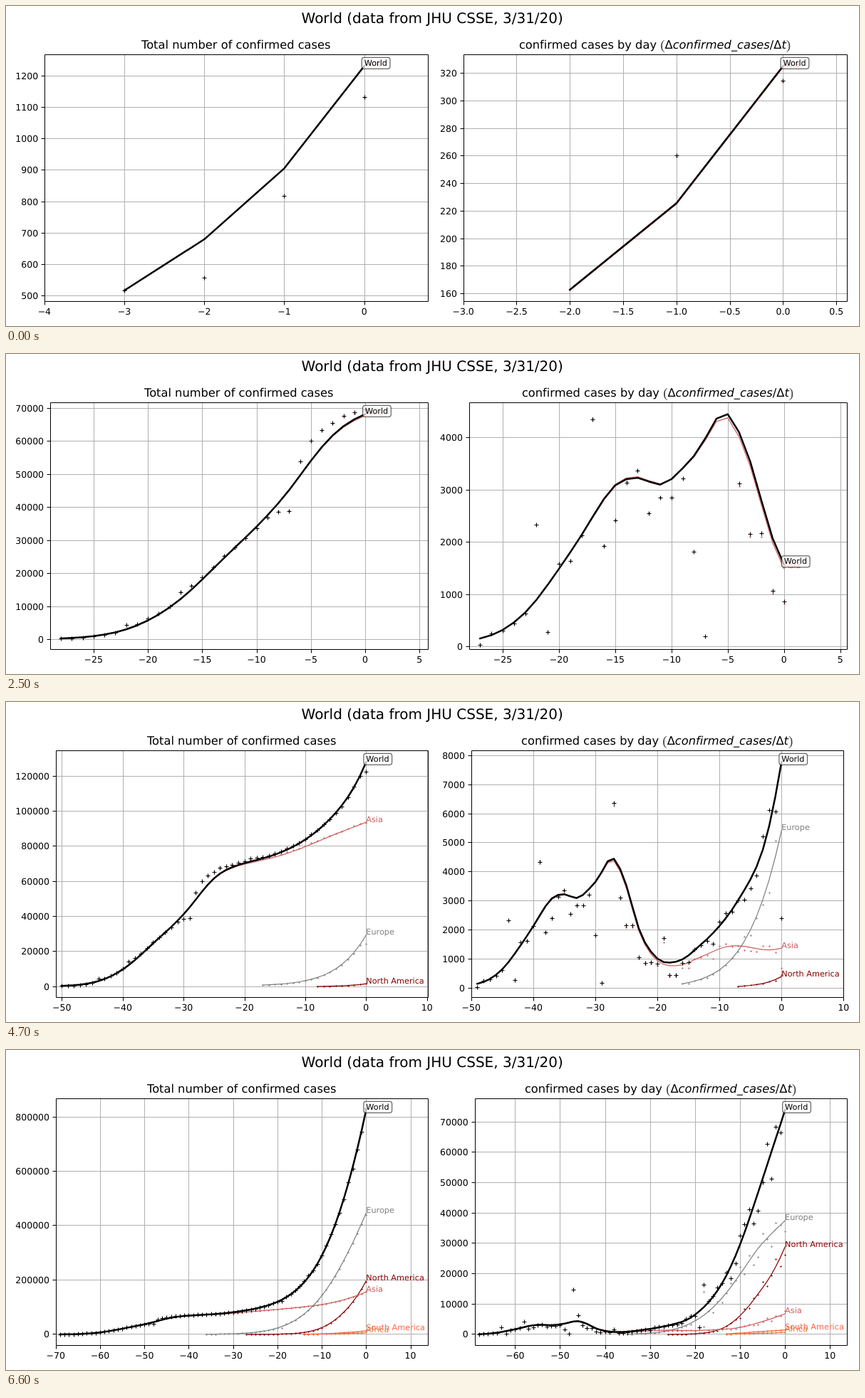
An HTML page for the animation above (9600 ms loop, 1197 by 450 pixels).

```html
<!DOCTYPE html>
<html lang="en">
<head>
<meta charset="utf-8">
<title>Confirmed cases</title>
<style>
  html, body { margin: 0; width: 100%; height: 100%; overflow: hidden; background: #fff; }
  svg { display: block; width: 1197px; height: 450px; }
  text { font-family: "DejaVu Sans", sans-serif; font-variant-ligatures: none; text-rendering: geometricPrecision; white-space: pre; }
  .tick { font-size: 12.5px; }
  .title { font-size: 16.25px; text-anchor: middle; }
  .name { font-size: 11.25px; }
  .paren { font: 19px "Liberation Serif", serif; fill: #444; }
  .var { font-style: italic; }
</style>
</head>
<body>
<svg id="stage" viewBox="0 0 1197 450"></svg>
<script>
const STEP_MS = 100, LAST_STEP = 66, LOOP_MS = 9600, LAST_DAY = 69;
const TOP = 68.8, BOTTOM = 415.8;
const PAD = 13.5, TICK = 4.375, DIGIT = 7.95, OVERHANG = 3.1, SHIFT = -.18;

// Smooth growth curve: cubic Hermite through [day, value] keys on a log scale, one value per day.
function growth(keys) {
  const points = keys.map(([day, value]) => [day, Math.log(value)]);
  const slope = i => (points[i + 1][1] - points[i][1]) / (points[i + 1][0] - points[i][0]);
  const end = points.length - 1;
  const tangents = points.map(([day], i) => {
    if (i === 0) return slope(0);
    if (i === end) return slope(end - 1);
    const before = day - points[i - 1][0], after = points[i + 1][0] - day;
    return (slope(i - 1) * after + slope(i) * before) / (before + after);
  });
  const values = [];
  for (let day = points[0][0]; day <= LAST_DAY; day++) {
    const i = Math.min(end - 1, points.findLastIndex(p => p[0] <= day));
    const [x, a] = points[i], b = points[i + 1][1], h = points[i + 1][0] - x, t = (day - x) / h;
    const ease = t * t * (3 - 2 * t);
    values.push(Math.exp(a + (b - a) * ease
      + h * t * (1 - t) * ((1 - t) * tangents[i] - t * tangents[i + 1])));
  }
  return values;
}

// Noisy daily reports that drift back to the trend's total; "jumps" are days reported far off trend.
function reports(start, trend, noise, jumps = {}) {
  let seed = 11 + start, gap = 0;
  const random = () => (seed = seed * 16807 % 2147483647) / 2147483647;
  for (let i = 0; i < 5; i++) random();
  return trend.map((v, i) => {
    const wobble = 1 + noise * (2 * random() - 1);
    const value = v * (jumps[start + i] ?? wobble) + (start + i in jumps ? 0 : .25 * gap);
    gap += v - value;
    return value;
  });
}
const cumulate = (base, daily) => daily.reduce((sums, v) => [...sums, sums.at(-1) + v], [base]);

const worldTrend = growth([[1, 163], [2, 226], [4, 470], [7, 1190], [10, 2140], [13, 3095], [15, 3240],
  [17, 3110], [20, 3660], [23, 4460], [25, 3550], [28, 1580], [31, 910], [33, 920], [37, 1510], [43, 3030],
  [47, 4780], [50, 7785], [55, 16900], [58, 26000], [62, 42300], [66, 60400], [69, 74050]]);
const worldReports = reports(1, worldTrend, .14,
  { 1: .25, 6: 2.6, 7: .24, 11: 1.75, 20: .5, 21: .05, 22: 3.42, 23: 1.43, 31: 1.9, 50: .31, 51: 1.81 });
const asiaShare = growth([[1, .997], [20, .995], [28, .95], [31, .912], [34, .815], [37, .72], [41, .595],
  [45, .376], [50, .178], [55, .106], [58, .083], [63, .0835], [69, .093]]);
const europeTrend = growth([[34, 160], [40, 640], [45, 2020], [50, 5430], [55, 12100], [59, 19900],
  [63, 28400], [66, 33300], [69, 37600]]);
const northTrend = growth([[43, 70], [46, 135], [50, 410], [54, 1480], [58, 4900], [62, 11400],
  [66, 19900], [69, 28900]]);
const southTrend = growth([[56, 300], [62, 850], [69, 1550]]);
const africaTrend = growth([[56, 140], [62, 390], [69, 800]]);

// "start" is the day of the first total; daily values begin one day later.
const region = (name, color, start, base, trend, daily) => ({
  name, color,
  total: { start, line: cumulate(base, trend), dots: cumulate(base, daily) },
  daily: { start: start + 1, line: trend, dots: daily },
});
const asiaPart = world => world.map((v, i) => v * asiaShare[i]);
const regions = [
  region('Africa', '#cd853f', 55, 900, africaTrend, reports(56, africaTrend, .15)),
  region('South America', '#ff6347', 55, 1000, southTrend, reports(56, southTrend, .2)),
  region('North America', '#8b0000', 42, 200, northTrend, reports(43, northTrend, .14)),
  region('Europe', '#808080', 33, 1000, europeTrend, reports(34, europeTrend, .14, { 50: .13, 51: 2.17 })),
  region('Asia', '#cd5c5c', 0, 518, asiaPart(worldTrend), asiaPart(worldReports)),
  region('World', '#000', 0, 518, worldTrend, worldReports),
];

const TITLES = {
  total: 'Total number of confirmed cases',
  daily: 'confirmed cases by day <tspan class="paren" dy="1">(</tspan><tspan dy="-1">Δ</tspan>'
    + '<tspan class="var">confirmed</tspan>_<tspan class="var">cases</tspan>/Δ<tspan class="var">t</tspan>'
    + '<tspan class="paren" dy="1">)</tspan>',
};

function ticks(lo, hi) {
  const raw = (hi - lo) / 9, scale = 10 ** Math.floor(Math.log10(raw));
  const step = scale * [1, 2, 2.5, 5, 10].find(s => s * scale >= raw - 1e-9);
  const list = [];
  for (let i = Math.ceil(lo / step - 1e-9); i <= Math.floor(hi / step + 1e-9); i++) {
    const value = i * step;
    list.push({ value, label: value.toFixed(step % 1 ? 1 : 0).replace('-', '−') });
  }
  return list;
}
const labelWidth = s => [...s].reduce((w, c) => w + (c === '.' ? DIGIT / 2 : DIGIT), 0);

function scales(kind, today) {
  const span = kind === 'total' ? today + 1 : today;
  const shown = regions.filter(r => r[kind].start <= today).map(r => {
    const { start, line, dots } = r[kind], count = today - start + 1;
    return { ...r, first: start - today, line: line.slice(0, count), dots: dots.slice(0, count) };
  });
  const values = shown.flatMap(r => r.line);
  const min = Math.min(...values), max = Math.max(...values), margin = (max - min) * .05;
  const p = { kind, shown, x0: -span, x1: span * .2, y0: min - margin, y1: max + margin };
  p.xTicks = ticks(p.x0, p.x1);
  p.yTicks = ticks(p.y0, p.y1);
  p.labels = 2 * TICK + Math.max(...p.yTicks.map(t => labelWidth(t.label)));
  const last = p.xTicks.at(-1);
  const room = (p.x1 - last.value) / (p.x1 - p.x0) * 525;
  p.overhang = Math.max(OVERHANG, labelWidth(last.label) / 2 - room);
  return p;
}

// Lines sit on whole pixels, counted from the lower left corner of the stage.
const snapX = x => Math.round(x) + .5;
const snapY = y => Math.round(y) - .5;
const plus = (x, y, r) => `M${x - r} ${y}h${2 * r}M${x} ${y - r}v${2 * r}`;

function drawPanel(p, left, width) {
  const right = left + width;
  const X = v => left + (v - p.x0) / (p.x1 - p.x0) * width;
  const Y = v => BOTTOM - (v - p.y0) / (p.y1 - p.y0) * (BOTTOM - TOP);
  const [l, r, t, b] = [snapX(left), snapX(right), snapY(TOP), snapY(BOTTOM)];
  let grid = '', marks = '', texts = '', curves = '', names = '';

  for (const { value, label } of p.xTicks) {
    const x = snapX(X(value));
    grid += `M${x} ${t}V${b}`;
    marks += `M${x} ${b}v5`;
    texts += `<text class="tick" x="${X(value)}" y="434" text-anchor="middle">${label}</text>`;
  }
  for (const { value, label } of p.yTicks) {
    const y = snapY(Y(value));
    grid += `M${l} ${y}H${r}`;
    marks += `M${l} ${y}h-5`;
    texts += `<text class="tick" x="${left - 2 * TICK}" y="${y + 4.5}" text-anchor="end">${label}</text>`;
  }

  for (const { name, color, first, line, dots } of p.shown) {
    const main = name === 'World';
    const points = line.map((v, i) => `${X(first + i).toFixed(2)},${Y(v).toFixed(2)}`).join(' ');
    const crosses = dots.map((v, i) =>
      plus(snapX(X(first + i)), Math.round(Y(v)) + .5, main ? 3 : 1.6)).join('');
    curves += `<polyline points="${points}" stroke="${color}" stroke-width="${main ? 2.5 : 1.25}"
        stroke-linejoin="round" stroke-linecap="square"/>
      <path d="${crosses}" stroke="${color}" stroke-width="${main ? 1.15 : .7}"/>`;
    const x = X(0), y = Y(line.at(-1));
    if (main) names += `<rect x="${x - 3.4}" y="${y - 12.2}" width="39.7" height="16" rx="3.4"
      fill="#fff" fill-opacity=".7" stroke="#000" stroke-opacity=".6" stroke-width="1.25"/>`;
    names += `<text class="name" x="${x}" y="${Math.floor(y)}" fill="${color}">${name}</text>`;
  }

  return `<clipPath id="${p.kind}"><rect x="${left}" y="${TOP}" width="${width}" height="${BOTTOM - TOP}"/></clipPath>
    <path d="${grid}" stroke="#b0b0b0"/>
    <g clip-path="url(#${p.kind})" fill="none">${curves}</g>
    <path d="${marks}M${l} ${t}H${r}V${b}H${l}Z" fill="none" stroke="#000"/>
    ${texts}${names}
    <text class="title" x="${left + width / 2 - .4}" y="60">${TITLES[p.kind]}</text>`;
}

const stage = document.getElementById('stage');

function draw(step) {
  const today = step + 3;
  const a = scales('total', today), b = scales('daily', today);
  const left = PAD + a.labels + SHIFT;
  const between = a.overhang + PAD + b.labels;
  const width = (1197 - PAD - b.overhang - left + SHIFT - between) / 2;
  stage.innerHTML = '<text x="598.2" y="24" font-size="20" text-anchor="middle">World (data from JHU CSSE, 3/31/20)</text>'
    + drawPanel(a, left, width) + drawPanel(b, left + width + between, width);
}

const began = performance.now();
let shownStep = -1;
function tick() {
  const time = (performance.now() - began) % LOOP_MS;
  const step = Math.min(LAST_STEP, Math.floor(time / STEP_MS));
  if (step !== shownStep) draw(shownStep = step);
  requestAnimationFrame(tick);
}
tick();
</script>
</body>
</html>
```
